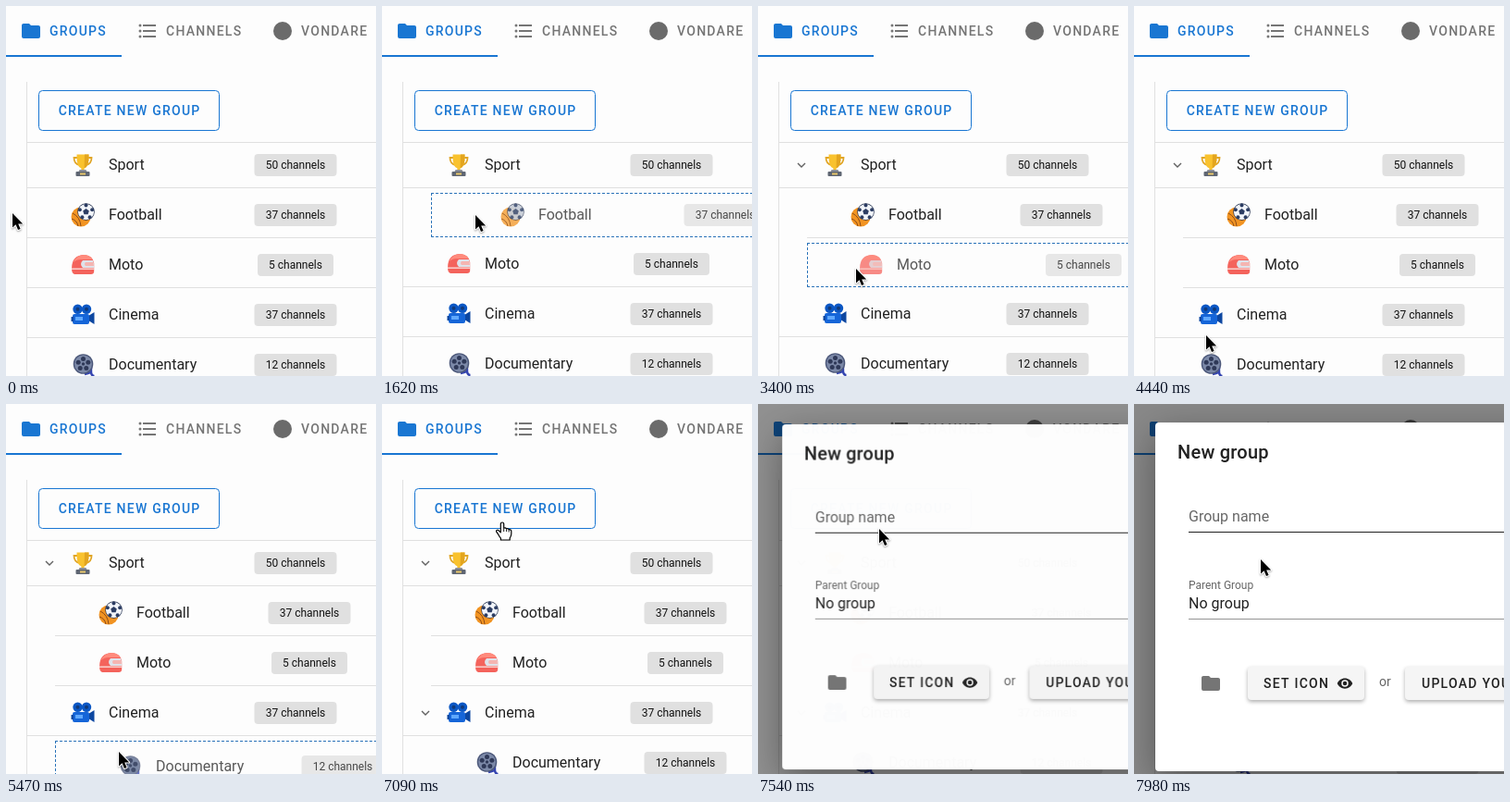
Recreate the animation shown at these times as an HTML page with a canvas. Size 400 by 400 pixels, loop 8 s.

```html
<!DOCTYPE html>
<html lang="en">
<head>
<meta charset="utf-8">
<title>Channel groups</title>
<style>
html, body { margin: 0; width: 100%; height: 100%; overflow: hidden; background: #fdfdfd; }
canvas { display: block; width: 400px; height: 400px; }
</style>
</head>
<body>
<canvas id="stage"></canvas>
<script>
const LOOP = 8000, STEP = 147.8;
const BLUE = '#1976d2', INK = '#212121', GREY = '#757575', LINE = '#e0e0e0', PAGE = '#fdfdfd';
const dpr = window.devicePixelRatio || 1;
const stage = document.getElementById('stage');
const PAD = 60;
const sheet = document.createElement('canvas');
stage.width = stage.height = 400 * dpr;
sheet.width = sheet.height = (400 + 2 * PAD) * dpr;
const main = stage.getContext('2d'), layer = sheet.getContext('2d');
let c = main;

const FOLDER = 'M10 4H4C2.89 4 2 4.89 2 6V18A2 2 0 0 0 4 20H20A2 2 0 0 0 22 18V8C22 6.89 21.1 6 20 6H12L10 4Z';
const EYE = 'M12 9A3 3 0 0 0 9 12A3 3 0 0 0 12 15A3 3 0 0 0 15 12A3 3 0 0 0 12 9M12 17A5 5 0 0 1 7 12A5 5 0 0 1 12 7A5 5 0 0 1 17 12A5 5 0 0 1 12 17M12 4.5C7 4.5 2.73 7.61 1 12C2.73 16.39 7 19.5 12 19.5C17 19.5 21.27 16.39 23 12C21.27 7.61 17 4.5 12 4.5Z';
const ARROW = 'M0 0V15.6L3.6 12.3L6 18L8.6 17L6.2 11.4H11.2Z';
const HAND = 'M-1.7 1.5Q-1.6 0 0 0Q1.6 0 1.7 1.5V6.2Q3.4 5.2 4.6 6.8Q6.4 6 7.2 7.7Q9.6 7.2 9.8 9.6V12.5Q9.6 15 8.2 16.8V19H-1.6V17.2Q-3.2 15.4-4.4 12.8L-6.4 9.8Q-6.6 7.8-4.4 8.4L-1.7 10.8Z';

function rect(x, y, w, h, fill) { c.fillStyle = fill; c.fillRect(x, y, w, h); }

function box(x, y, w, h, r, fill) {
  c.beginPath();
  c.roundRect(x, y, w, h, r);
  c.fillStyle = fill;
  c.fill();
}

function disc(x, y, r, fill) {
  c.beginPath();
  c.arc(x, y, r, 0, 7);
  c.fillStyle = fill;
  c.fill();
}

function fill(d, color) { c.fillStyle = color; c.fill(new Path2D(d)); }

function stroke(d, color, width) {
  c.strokeStyle = color;
  c.lineWidth = width;
  c.stroke(new Path2D(d));
}

function text(s, x, y, size, color, weight = 400, spacing = 0, align = 'left') {
  c.font = `${weight} ${size}px Roboto, sans-serif`;
  c.letterSpacing = spacing + 'px';
  c.textAlign = align;
  c.fillStyle = color;
  c.fillText(s, x, y);
}

const caps = (s, x, y, color) => text(s, x, y, 14, color, 500, 1.25);

function at(x, y, draw, scale = 1) {
  c.save();
  c.translate(x, y);
  c.scale(scale, scale);
  draw();
  c.restore();
}

function shadow(color, blur, dy) {
  c.shadowColor = color;
  c.shadowBlur = blur * dpr;
  c.shadowOffsetY = dy * dpr;
}

// Icons, each about 25px wide around the origin
function trophy() {
  stroke('M-6-8H-9.5Q-9.5-1-3 0M6-8H9.5Q9.5-1 3 0', '#e0a526', 1.8);
  fill('M-6.5-11.5H6.5Q7 2 1.6 3.5V6H-1.6V3.5Q-7 2-6.5-11.5Z', '#f9c22e');
  fill('M2-11.5H6.5Q7 2 1.6 3.5Z', '#e3a51f');
  fill('M-3.5 5H3.5L5 8H-5Z', '#8d8f96');
  box(-7.5, 7, 15, 5, 1, '#5f6673');
  rect(-3, 8.5, 6, 2, '#e7c66a');
}

function balls() {
  disc(-2, 2, 10.5, '#f29422');
  stroke('M-11-2Q-3 2-2 12M-12 4Q-6 6-5 12', '#8a4a18', 1);
  disc(3.5, -3.5, 9.3, '#25324f');
  disc(3.5, -3.5, 8.6, '#f2f5fa');
  for (let i = 0; i < 5; i++) {
    const a = i * Math.PI * 0.4 - Math.PI / 2;
    disc(3.5 + 7 * Math.cos(a), -3.5 + 7 * Math.sin(a), 2, '#2c3d63');
  }
  fill('M3.5-7L6.8-4.6L5.6-.8H1.4L.2-4.6Z', '#2c3d63');
}

function helmet() {
  fill('M-12 4Q-12-11 2-11Q11-10 12.2-2V7Q12 10 9 10H-9Q-12 9-12 4Z', '#f4635c');
  fill('M-10-3Q-7-11 2-11Q8-10.5 10.5-6H-2Q-7-6-10-3Z', '#ff8b7d');
  fill('M0-5H10.8Q12.3-2 12.3 3H0Q-4-1 0-5Z', '#dfe3ea');
  fill('M3-3H11.4L12 1H3Q1-1 3-3Z', '#f5b5b1');
  rect(-12, 3.5, 24, 1.4, '#fbd9d5');
}

function camera() {
  fill('M6 1L12.5-3V10L6 6Z', '#0d47a1');
  box(-11, -1, 18, 11, 2, '#1565d8');
  disc(-5.5, -6.2, 5.2, '#0b57c4');
  disc(4, -6.2, 5.2, '#0b57c4');
  disc(-5.5, -6.2, 2, '#123a78');
  disc(4, -6.2, 2, '#123a78');
  rect(-8, 2, 8, 4, '#5fa8ff');
  rect(-12.5, 2, 2.5, 5, '#0d47a1');
}

function reel() {
  stroke('M2 10Q8 9 9 7Q9 12 12.5 12', '#3444b0', 2.4);
  disc(.5, -1, 10.8, '#4c587a');
  disc(.5, -1, 9.4, '#7c89a8');
  for (let i = 0; i < 5; i++) {
    const a = i * Math.PI * 0.4 - Math.PI / 2;
    disc(.5 + 5.6 * Math.cos(a), -1 + 5.6 * Math.sin(a), 2.5, '#2f3958');
  }
  disc(.5, -1, 1.7, '#2f3958');
}

// nest: step at which the group becomes a child; open: step at which it gains a chevron
const rows = [
  { name: 'Sport', count: 50, icon: trophy, nest: 99, open: 15 },
  { name: 'Football', count: 37, icon: balls, nest: 15, open: 99 },
  { name: 'Moto', count: 5, icon: helmet, nest: 27, open: 99 },
  { name: 'Cinema', count: 37, icon: camera, nest: 99, open: 42 },
  { name: 'Documentary', count: 12, icon: reel, nest: 42, open: 99 }
];

const drags = [
  { row: 1, from: 9, to: 15, indent: 10, x: 43, y: 226 },
  { row: 2, from: 21, to: 27, indent: 23, x: 67, y: 284 },
  { row: 4, from: 33, to: 42, indent: 34, x: 71, y: 372 }
];

// Pointer stops: step, x, y; straight runs in between
const stops = [
  [0, 7, 224], [2, 7, 224], [3, 62, 219], [4, 145, 215], [5, 43, 226], [8, 43, 226],
  [9, 60, 226], [10, 88, 226], [11, 101, 226], [15, 101, 226], [17, 82, 260], [19, 67, 284],
  [20, 67, 284], [23, 106, 284], [27, 106, 284], [29, 85, 340], [31, 71, 372], [32, 71, 372],
  [34, 95, 375], [37, 122, 376], [42, 122, 376], [43, 121, 350], [45, 121, 220], [47, 130, 132],
  [48, 130, 128], [50, 130, 129], [51, 131, 135], [53, 136, 163], [54, 137, 168]
];

function pointer(n) {
  const i = stops.findIndex(s => s[0] >= n);
  if (i < 1) return stops[i < 0 ? stops.length - 1 : 0].slice(1);
  const [a, ax, ay] = stops[i - 1], [b, bx, by] = stops[i];
  const k = (n - a) / (b - a);
  return [ax + (bx - ax) * k, ay + (by - ay) * k];
}

function header() {
  at(15, 15, () => fill(FOLDER, BLUE));
  caps('GROUPS', 47, 32, BLUE);
  for (const y of [21, 27, 33]) {
    disc(145, y, 1.5, GREY);
    rect(148, y - 1, 14, 2, GREY);
  }
  caps('CHANNELS', 173, 32, GREY);
  disc(299, 27, 10, '#6b6b6b');
  caps('VONDARE', 319, 32, GREY);
  rect(0, 53, 125, 2, BLUE);
}

function group(row, x, y, child) {
  const inset = child ? 30 : 0;
  const label = row.count + ' channels';
  const mid = x + 313 + inset / 2;
  at(x + 83 + inset, y, row.icon);
  text(row.name, x + 111 + inset, y + 5, 16, INK);
  c.font = '400 12px Roboto, sans-serif';
  c.letterSpacing = '0px';
  const w = Math.round(c.measureText(label).width) + 24;
  box(mid - w / 2, y - 12, w, 24, 4, LINE);
  text(label, mid, y + 4, 12, '#111', 400, 0, 'center');
}

function list(n, px, py) {
  const drag = drags.find(d => n >= d.from && n < d.to);
  rect(22, 82, 1, 318, LINE);
  rect(23, 147, 377, 1, LINE);
  rows.forEach((row, i) => {
    const y = 172 + 54 * i - (drag && i > drag.row ? 1 : 0);
    if (drag && drag.row === i) {
      const left = n >= drag.indent ? 53 : 23;
      c.setLineDash([3, 2]);
      stroke(`M${left} ${y - 23.5}H400M${left + .5} ${y - 24}V${y + 24}M${left} ${y + 23.5}H400`, '#2a72b8', 1);
      c.setLineDash([]);
      return;
    }
    const child = n >= row.nest;
    rect(child ? 53 : 23, y + 24, 377, 1, LINE);
    group(row, 0, y, child);
    if (n >= row.open) stroke(`M43 ${y - 2}l4 4l4-4`, '#616161', 1.4);
  });
  if (drag) {
    c.globalAlpha = .75;
    group(rows[drag.row], px - drag.x, 172 + 54 * drag.row + py - drag.y, false);
    c.globalAlpha = 1;
  }
}

function createButton(pressed) {
  c.beginPath();
  c.roundRect(35.5, 91.5, 195, 43, 4);
  c.fillStyle = pressed ? '#e2edf8' : PAGE;
  c.fill();
  c.strokeStyle = BLUE;
  c.lineWidth = 1;
  c.stroke();
  text('CREATE NEW GROUP', 133.6, 118, 14, BLUE, 500, 1.25, 'center');
}

function raised(x, w) {
  c.save();
  shadow('rgba(0,0,0,.32)', 4, 2);
  box(x, 284, w, 36, 4, '#f5f5f5');
  c.restore();
}

function dialog(n) {
  const soft = 'rgba(0,0,0,.6)';
  c.save();
  shadow('rgba(0,0,0,.38)', 42, 12);
  box(23, 20, 628, 377, 4, '#fff');
  c.restore();
  text('New group', 47, 59, 20, INK, 500, .25);
  text('Group name', 59, 127, 16, soft);
  rect(59, 138, 560, 1, INK);
  if (n === 50) text('The title cannot be empty', 59, 150, 12, 'rgba(0,0,0,.3)');
  text('Parent Group', 59, 200, 12, soft);
  text('No group', 59, 221, 16, INK);
  rect(59, 232, 560, 1, 'rgba(0,0,0,.42)');
  at(71, 290, () => fill(FOLDER, GREY));
  raised(123, 126);
  caps('SET ICON', 140, 307, INK);
  at(219, 293, () => fill(EYE, INK), .75);
  text('or', 265, 305, 14, soft);
  raised(293, 190);
  caps('UPLOAD YOUR ICON', 311, 307, INK);
}

function modal(n) {
  const first = n === 50;
  const grow = first ? .761 : n === 51 ? .99 : 1;
  rect(0, 0, 400, 400, `rgba(0,0,0,${first ? .16 : n === 51 ? .43 : .46})`);
  c = layer;
  c.setTransform(dpr, 0, 0, dpr, 0, 0);
  c.clearRect(0, 0, 400 + 2 * PAD, 400 + 2 * PAD);
  c.translate(PAD, PAD);
  dialog(n);
  c = main;
  c.globalAlpha = first ? .52 : n === 51 ? .98 : 1;
  at(337, 208.5, () => {
    c.drawImage(sheet, -PAD - 337, -PAD - 208.5, 400 + 2 * PAD, 400 + 2 * PAD);
  }, grow);
  c.globalAlpha = 1;
}

function cursor(n, x, y) {
  const hand = n >= 47 && n < 50;
  at(x, y, () => {
    c.lineJoin = 'round';
    if (hand) {
      fill(HAND, '#fff');
      stroke(HAND, '#000', 1.2);
      stroke('M1.7 6.5V10M4.6 7.2V10M7.2 8V10.5', '#000', .9);
    } else {
      c.save();
      shadow('rgba(0,0,0,.35)', 2, 1);
      stroke(ARROW, '#fff', 2);
      c.restore();
      fill(ARROW, '#000');
    }
  });
}

function draw(n) {
  const [px, py] = pointer(n);
  c.setTransform(dpr, 0, 0, dpr, 0, 0);
  rect(0, 0, 400, 400, PAGE);
  header();
  createButton(n === 49);
  list(n, px, py);
  if (n >= 50) modal(n);
  cursor(n, px, py);
}

const start = performance.now();
function tick() {
  const t = (performance.now() - start) % LOOP;
  draw(Math.min(54, Math.floor((t + 8) / STEP)));
  requestAnimationFrame(tick);
}
tick();
</script>
</body>
</html>
```
